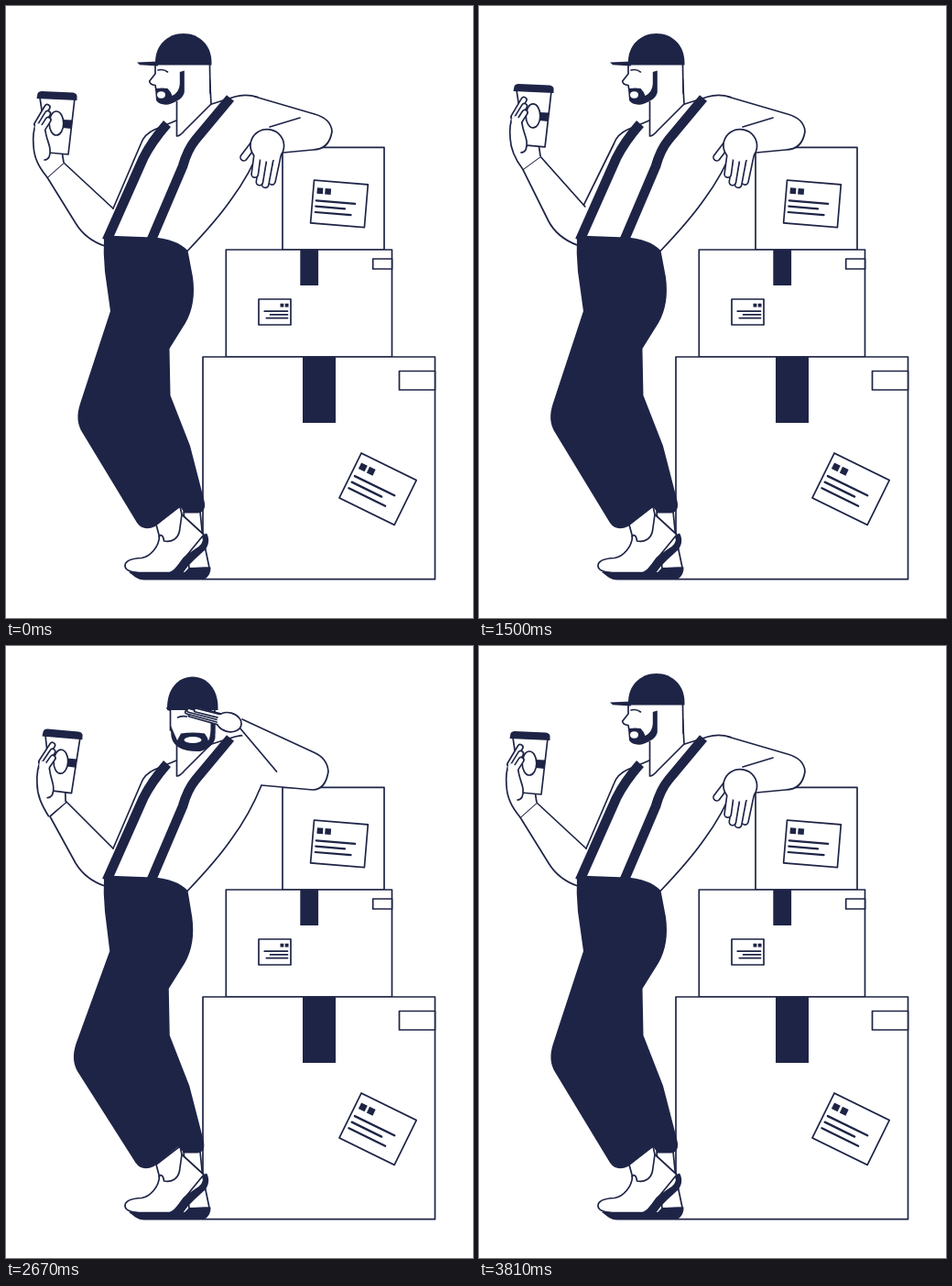
An HTML page with a canvas that plays this animation: 510 by 668 pixels, repeating every 3840 ms.

```html
<!DOCTYPE html>
<html lang="en">
<head>
<meta charset="utf-8">
<title>Courier break</title>
<style>
html, body { margin: 0; width: 100%; height: 100%; overflow: hidden; background: #fff; }
canvas { display: block; width: 510px; height: 668px; }
</style>
</head>
<body>
<canvas id="stage" width="510" height="668"></canvas>
<script>
const LOOP = 3840, STEP = 30;
const INK = '#1e2446', PAPER = '#fff';
const ctx = document.getElementById('stage').getContext('2d');

const mix = (a, b, k) => a + (b - a) * k;
const clamp = v => Math.max(0, Math.min(1, v));
function ease(t, from, to) {
  const u = clamp((t - from) / (to - from));
  return u * u * (3 - 2 * u);
}
// Rises from a to b, holds, falls from c to d.
const pulse = (t, a, b, c, d) => ease(t, a, b) - ease(t, c, d);

function pose(t) {
  return {
    lift: pulse(t, 0, 780, 900, 1830),
    nod: pulse(t, 0, 780, 900, 1530),
    drift: pulse(t, 1500, 1950, 2700, 3750),
    sway: pulse(t, 0, 780, 900, 1590) + 0.75 * pulse(t, 1560, 2000, 3270, 3800),
    turn: pulse(t, 1560, 2340, 2850, 3720),
    raise: pulse(t, 1620, 2340, 3000, 3780)
  };
}

function stroke(d, width = 1.7) {
  ctx.lineWidth = width;
  ctx.stroke(new Path2D(d));
}
function fill(d, color = INK) {
  ctx.fillStyle = color;
  ctx.fill(new Path2D(d));
}
function shape(d) {
  fill(d, PAPER);
  stroke(d);
}
function oval(x, y, rx, ry, line = 0) {
  ctx.beginPath();
  ctx.ellipse(x, y, rx, ry, 0, 0, 2 * Math.PI);
  ctx.fillStyle = PAPER;
  ctx.fill();
  ctx.lineWidth = line;
  if (line) ctx.stroke();
}
function placed(x, y, angle, paint) {
  ctx.save();
  ctx.translate(x, y);
  ctx.rotate(angle);
  paint();
  ctx.restore();
}
function finger(x0, y0, x1, y1, size) {
  const d = `M${x0},${y0}L${x1},${y1}`;
  stroke(d, size);
  ctx.strokeStyle = PAPER;
  stroke(d, size - 3.3);
  ctx.strokeStyle = INK;
}
const rect = (x, y, w, h) => shape(`M${x},${y}h${w}v${h}h${-w}Z`);
const block = (x, y, w, h) => fill(`M${x},${y}h${w}v${h}h${-w}Z`);

// Shipping label: two squares over three lines, sized from its width.
function label(x, y, angle, w, h, mirrored) {
  placed(x, y, angle, () => {
    rect(0, 0, w, h);
    const s = w * 0.11, top = h * 0.17;
    for (const n of [0, 1]) {
      const sx = w * 0.07 + n * s * 1.35;
      block(mirrored ? w - sx - s : sx, top, s, s);
    }
    for (const n of [0, 1, 2]) {
      const len = w * (0.72 - (n === 1 ? 0.18 : n * 0.03));
      const lx = mirrored ? w * 0.9 - len : w * 0.07;
      stroke(`M${lx},${h * (0.47 + 0.135 * n)}h${len}`, 1.1 + w * 0.019);
    }
  });
}

function boxes() {
  rect(302, 154.3, 111, 111.7);
  label(336.5, 190, 0.083, 59, 47);
  rect(240.3, 266, 181.2, 117);
  block(321.3, 266, 19.8, 39);
  rect(400.7, 276, 20.8, 11);
  label(276, 320, 0, 35, 28, true);
  rect(215, 383, 253.5, 242.7);
  block(324, 383, 36, 72);
  rect(429.5, 398.5, 39, 20.5);
  label(388, 488, 0.456, 67, 54.5);
}

function shoes() {
  shape('M194,552L212,552L214.5,577L222,613L200,614Z');
  fill('M134,618L195,618L200,613L223.5,612.5C224,620 219,626.5 213,626.5L151,626.5C143,626.5 140,622 134,618Z');
  shape('M164,566L167.5,579C167,590 158,601 148,602.5C138,603 130,605 130,611'
    + 'C130,616 137,618 145,618.5L182,618.5L216,577L192,555L190,546Z');
  stroke('M167,579C169,576 172,578 172.5,584C181,586 188,581 189.5,573L192,555');
  fill('M216,577L219,575.5C222,580 222.5,588 217,594L206,604Q198,611 193,619L176,619'
    + 'C188,615 190,604 196,600L206,593Q216,588 216,577Z');
}

function trousers(sway) {
  const hip = -sway, knee = -6 * sway, hem = -2 * sway;
  fill(`M107,250.5L160,252.5Q186,254 198.5,267L${204 + hip},296Q${208 + hip},325 ${196 + hip},346L${178.5 + hip},374`
    + `L${179.5 + hip},425L${201 + hip},480L${216 + hip},538Q${220 + hip},553 ${209 + hip},553.5L${195 + hip},553.5L${190 + hem},546`
    + `L${163 + hem},568Q${150 + hem},574 ${143 + hem},564L${83 + knee},465Q${75 + knee},452 ${81 + knee},434`
    + `L${114 + hip},333L108,290Q106,270 107,250.5Z`);
}

function torso(lift) {
  fill('M186,125L224,107L250,99L279,152L198,267Q180,254 107,250L150,148Z', PAPER);
  stroke('M279,152Q266,184 246,211Q230,234 198.5,267');
  stroke(`M186,125L162,135Q151,140 147.5,150L${mix(117, 108.5, lift)},${mix(221, 207, lift)}`);
  ctx.lineCap = 'butt';
  stroke('M176,128.5Q159,148 150,166L110,256', 10.5);
  stroke('M245,100.5L207,146Q198,157 193,175L158,257', 10.5);
  ctx.lineCap = 'round';
  stroke('M223,107.5L250,99Q262,95.5 275,99.5');
}

function head(turn, nod) {
  const at = (side, front) => mix(side, front, turn);
  const profile = clamp(1 - turn / 0.4);
  fill('M186,95L224,95L224,107L186.5,142Z', PAPER);
  stroke('M186.5,100L186.5,142Q190,142 195,136L224,107L222.5,80');

  ctx.save();
  ctx.translate(208, 76);
  ctx.rotate(-0.075 * nod);
  ctx.translate(-208, -76);

  const face = at(163, 179.5), cheek = at(222.5, 228);
  fill(`M${face},62L${cheek},62L${cheek},95L${at(187, 215)},${at(104, 112)}L${face + 4},${at(103, 108)}Z`, PAPER);
  stroke(`M${cheek},64L${at(223, 227.5)},95`);
  stroke(`M${face},64L${face},74L${face - 6.3 * profile},82Q${face - 6 * profile},86 ${face},86.5L${face + profile},92`);

  // Beard: sideburn, jaw, then back along the moustache.
  const burn = at(192.3, 226), mouth = at(169.5, 204), lip = at(97, 102.5);
  const jaw = at(94, 100), chin = at(107.5, 115);
  fill(`M${burn - 2.5},72L${burn + 2.5},70.5L${burn + 2.5},${jaw}Q${burn + 1},${chin - 5} ${mouth + 8},${chin}`
    + `Q${mouth - at(2, 20)},${chin + 1} ${face + 1},${at(103, 99)}L${face},${at(90, 86)}L${mouth - at(5, 17)},${at(90, 103)}`
    + `L${mouth - at(4, 13)},${lip - 7}Q${mouth},${lip - at(8, 9)} ${mouth + at(7, 13)},${lip - 7}`
    + `Q${mouth + at(11, 16)},${lip - 3} ${mouth + at(12, 17)},${lip + 1}Q${burn - 3},${jaw} ${burn - 2.5},${jaw - 9}Z`);
  oval(mouth, lip, at(4.5, 9.5), at(3.7, 3.6));

  const browY = at(70, 77), near = at(171, 214), far = at(158, 192.5);
  stroke(`M${near - 5},${browY}Q${near + 1},${browY - 1.5} ${near + 5.5},${browY + 2}`, 1.6);
  const from = Math.max(face, far - 5);
  if (from < far + 5) stroke(`M${from},${browY + 1}Q${far},${browY - 1} ${far + 5},${browY}`, 1.6);

  const l = at(163, 176), r = at(224.5, 231.5), brim = at(64.5, 70), top = at(30, 33.5);
  const base = brim - 3, mid = (l + r) / 2, hx = (r - l) * 0.29, hy = base - (base - top) * 0.58;
  fill(`M${l},${brim}L${l},${base}C${l},${hy} ${mid - hx},${top} ${mid},${top}`
    + `C${mid + hx},${top} ${r},${hy} ${r},${base}L${r},${brim}Z`);
  fill(`M${l - 19 * profile - 1},${brim - 3}L${l + 3},${brim - 4}L${l + 3},${brim + 1}L${l - 17 * profile},${brim - 0.2}Z`);
  ctx.restore();
}

function cupArm(lift, drift) {
  const dx = 14 * lift + 4 * drift, dy = -28 * lift - 2 * drift;
  const cuffOut = [mix(45, 55, lift) + 3 * drift, mix(187, 157, lift) - drift];
  const cuffIn = [mix(63, 77, lift) + 3 * drift, mix(171, 147.5, lift) - drift];
  stroke(`M${mix(117, 113, lift)},${mix(221, 214, lift)}L${cuffIn}L${cuffOut}`
    + `L${mix(76, 73, lift)},${mix(237, 224, lift)}`
    + `Q${mix(87, 79, lift)},${mix(255, 247, lift)} ${mix(108, 107, lift)},${mix(262, 259, lift)}`);

  ctx.save();
  ctx.translate(dx + 50, dy + 150);
  ctx.rotate(0.04 * drift);
  ctx.translate(-50, -150);
  const out = [cuffOut[0] - dx, cuffOut[1] - dy], inner = [cuffIn[0] - dx, cuffIn[1] - dy];
  stroke(`M61,158L${inner}`);
  shape('M37,100L46,160L68,162L75,101Z');
  fill('M62,124L72.5,124.5L71.5,134L62,133Z');
  fill('M33.5,101L34.5,95.5Q35.5,93 39,93L73,94.5Q77,95 77.5,98L77.5,103Z');
  oval(55, 128, 7.8, 13, 1.7);
  const palm = `M${out}C36,176 30.5,166 30,152C29,142 30,135 33,127`;
  fill(palm + `L44,130C44,144 50,154 47,165L${inner}Z`, PAPER);
  stroke(palm);
  for (const n of [0, 1, 2]) finger(34 + n, 129 + 5.5 * n, 45 + 0.5 * n, 110.5 + 7 * n, 7.6);
  fill('M31.6,131L35,128L41,131L43,140L44,150L32,150Z', PAPER);
  stroke('M43,136C44,147 51,155 47,165Q45,168 42,168');
  ctx.restore();
}

// Hand along its own x axis; closes and narrows as it is raised.
function hand(raise) {
  const width = mix(1, 0.34, raise), size = mix(9, 5.6, raise);
  finger(10, 13 * width, mix(33, 46, raise), mix(25, 5, raise), size);
  const palm = [mix(16, 11, raise), mix(2, 0, raise), mix(17, 13, raise), mix(17.5, 9.5, raise)];
  oval(...palm, 3.4);
  for (let n = -1.5; n < 2; n++) {
    finger(20, n * 7.4 * width, 58 - 3 * n * n - 1.5 * n, n * 6.6 * width, size);
  }
  oval(...palm);
}

function boxArm(raise) {
  const start = clamp(raise * 3), end = clamp((raise - 0.6) / 0.4);
  const wx = mix(290, 254, raise), wy = mix(137, 86, raise);
  const elbow = mix(356, 352, raise);
  const fold = `${mix(288, 255, raise)},${mix(132, 89, raise)}`;
  const sleeve = `M${mix(272, 258, end)},${mix(99, 80, end)}L337,${mix(118, 116.5, end)}`
    + `Q${elbow - 1},123 ${elbow},137Q${elbow - 3},156.5 335,157L${mix(303, 279, start)},${mix(160, 152, start)}`;
  fill(sleeve + `L${fold}Z`, PAPER);
  stroke(sleeve);
  stroke(`M${fold}L${mix(321, 295.5, raise)},${mix(122, mix(158, 137, raise), start)}`);
  const angle = (100 + 95 * Math.pow(raise, 0.8)) * Math.PI / 180;
  placed(wx, wy, angle, () => hand(raise));
}

function draw(t) {
  const p = pose(t);
  ctx.fillStyle = PAPER;
  ctx.fillRect(0, 0, 510, 668);
  ctx.strokeStyle = INK;
  ctx.lineCap = ctx.lineJoin = 'round';
  boxes();
  shoes();
  torso(p.lift);
  cupArm(p.lift, p.drift);
  trousers(p.sway);
  head(p.turn, p.nod);
  boxArm(p.raise);
}

const begin = performance.now();
function tick() {
  const t = (performance.now() - begin) % LOOP;
  draw(Math.floor(t / STEP) * STEP);
  requestAnimationFrame(tick);
}
tick();
</script>
</body>
</html>
```
